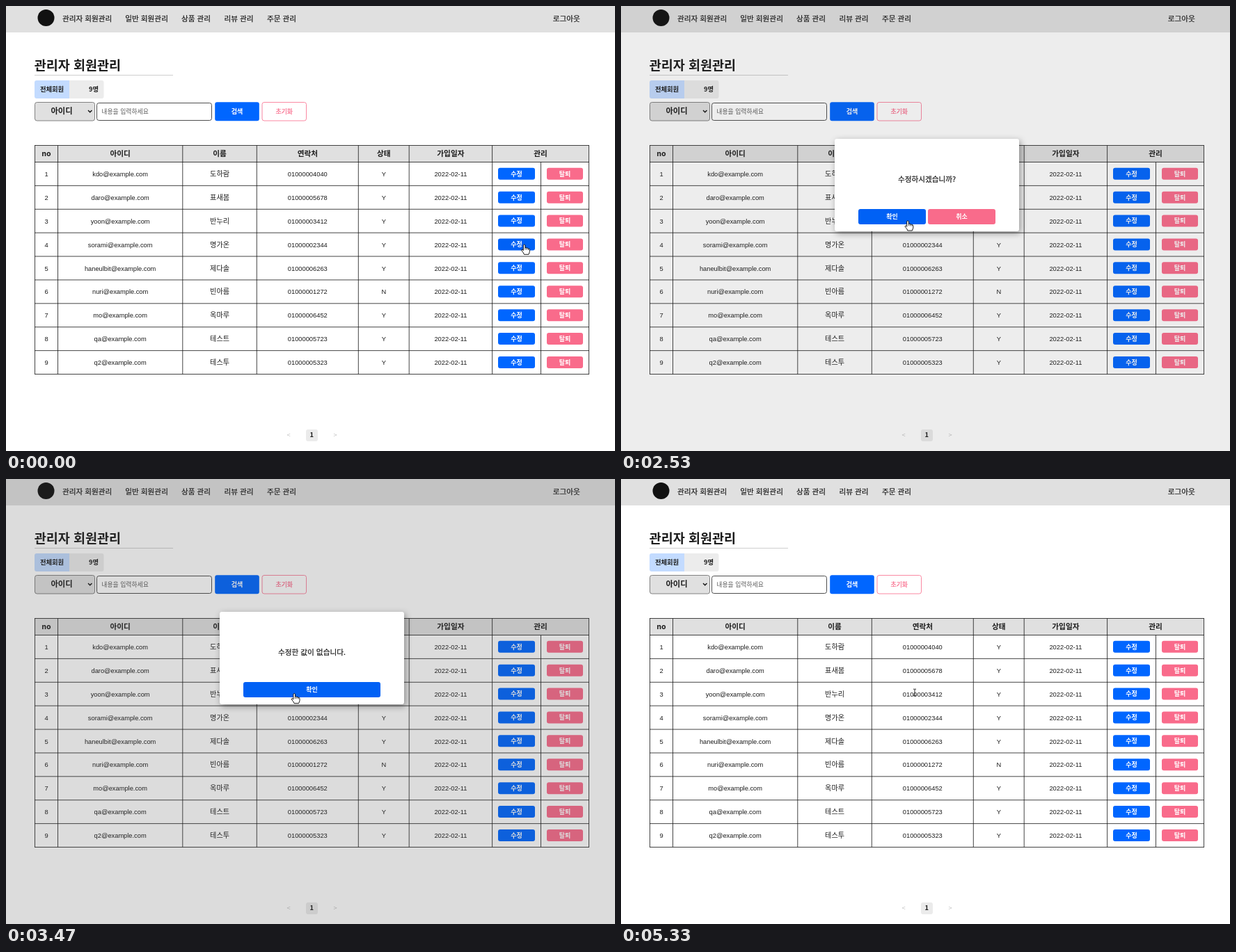
These frames come from a looping animation (875x640 px, 5.39 s). An HTML page:

```html
<!DOCTYPE html>
<html lang="ko">
<head>
<meta charset="utf-8">
<title>관리자 회원관리</title>
<style>
html, body { margin: 0; width: 100%; height: 100%; overflow: hidden; background: #fff; }
svg { display: block; width: 875px; height: 640px; }
text { font-family: "Noto Sans CJK KR", "Noto Sans CJK", "Noto Sans KR", sans-serif; white-space: pre; }
text.latin { font-family: "Liberation Sans", Arial, sans-serif; }
#modal { filter: drop-shadow(2px 3px 5px rgba(0, 0, 0, .38)); }
</style>
</head>
<body>
<svg id="stage" viewBox="0 0 875 640" xmlns="http://www.w3.org/2000/svg">
  <g id="page"></g>
  <rect id="shade" width="875" height="640" fill="#444" opacity="0"/>
  <rect id="modal" x="307" y="191" width="265" height="133" rx="3.3" fill="#fff"/>
  <g id="ask"></g>
  <g id="notice"></g>
  <g id="hand" fill="#fff" stroke="#000" stroke-width=".9" stroke-linejoin="round">
    <path d="M-1.3 .9Q0 -.7 1.3 .9V4.7Q2.6 4 3.6 5.2Q5 4.6 5.9 6Q7.6 5.6 7.8 7.4V10.4L6.4 14.3H-.2L-1.2 12L-3.8 8.7Q-4.1 6.9 -2.4 7.4L-1.3 8.6Z"/>
    <path d="M1.3 4.7V7.6M3.6 5.2V7.8M5.9 6V8" fill="none" stroke-width=".7"/>
  </g>
  <path id="arrow" d="M.4 .6V11.4L2.8 9.1L4.5 12.9L6.1 12.2L4.4 8.5H7.7Z" fill="#fff" stroke="#000" stroke-width=".85"/>
  <path id="beam" d="M-2 -4.8H-.6L0 -4.3L.6 -4.8H2M0 -4.3V4.3M-2 4.8H-.6L0 4.3L.6 4.8H2" fill="none" stroke="#111" stroke-width=".9"/>
</svg>
<script>
const $ = id => document.getElementById(id);
const BLUE = '#0066ff', HOVER = '#0061f5', PINK = '#f96b8b', GREY = '#e0e0e0', INK = '#1c1c1c';
const LOOP = 5390;

function add(parent, tag, attrs, content) {
  const el = document.createElementNS('http://www.w3.org/2000/svg', tag);
  for (const key in attrs) el.setAttribute(key, attrs[key]);
  if (content !== undefined) el.textContent = content;
  parent.appendChild(el);
  return el;
}

const box = (parent, x, y, width, height, fill, more) =>
  add(parent, 'rect', { x, y, width, height, fill, ...more });

// y is the middle of the line of text
function label(parent, content, x, y, size, more) {
  return add(parent, 'text', {
    x, y: y + size * 0.37, 'font-size': size, fill: INK, 'text-anchor': 'middle', ...more
  }, content);
}

const bold = { 'font-weight': 700 };
const left = { 'text-anchor': 'start' };
// a hairline outline gives a weight between regular and bold
const medium = (color = INK) => ({ fill: color, stroke: color, 'stroke-width': .22 });

function button(parent, content, x, y, w, h, fill) {
  const face = box(parent, x, y, w, h, fill, { rx: 3 });
  label(parent, content, x + w / 2, y + h / 2, 9, { ...bold, fill: '#fff' });
  return face;
}

function drawTop(page) {
  box(page, 0, 0, 875, 38, GREY);
  add(page, 'circle', { cx: 57.5, cy: 17, r: 12, fill: '#111' });
  const menu = [['관리자 회원관리', 81], ['일반 회원관리', 171.3], ['상품 관리', 252], ['리뷰 관리', 313.5], ['주문 관리', 375], ['로그아웃', 785.7]];
  for (const [name, x] of menu) label(page, name, x, 17.6, 10.63, { ...left, ...medium() });

  label(page, '관리자 회원관리', 40.7, 85.3, 18.5, { ...left, ...bold });
  box(page, 41, 99, 199, .8, '#c4c4c4');

  add(page, 'path', { d: 'M91 107H44a3 3 0 0 0 -3 3v20a3 3 0 0 0 3 3h47z', fill: '#c3dbff' });
  add(page, 'path', { d: 'M91 107h46.5a3 3 0 0 1 3 3v20a3 3 0 0 1 -3 3H91z', fill: '#ececec' });
  label(page, '전체회원', 66, 119.8, 9.3, bold);
  label(page, '9명', 133, 119.8, 9.3, { ...bold, 'text-anchor': 'end' });
}

function drawSearch(page) {
  const border = { rx: 3, 'stroke-width': .8 };
  box(page, 41.5, 138.5, 86, 26.5, GREY, { ...border, stroke: '#666' });
  label(page, '아이디', 80, 151.2, 11.3, bold);
  add(page, 'path', { d: 'M118 150l2.7 2.8l2.7 -2.8', fill: 'none', stroke: '#111', 'stroke-width': 1.4 });
  box(page, 130.5, 139.5, 165, 25, '#fff', { ...border, stroke: '#222' });
  label(page, '내용을 입력하세요', 137.3, 151.8, 8.86, { ...left, fill: '#5c5c5c' });
  button(page, '검색', 300.2, 138.2, 63.6, 27.1, BLUE);
  box(page, 368, 138.5, 63.5, 26.5, '#fff', { ...border, stroke: PINK });
  label(page, '초기화', 399.8, 151.8, 8.86, medium(PINK));
}

function drawTable(page) {
  const columns = [41.5, 74.5, 253.8, 360.3, 506.3, 579.2, 698.6, 768.5, 837.5];
  const rowY = i => 224.5 + i * 33.89;
  const mid = i => (columns[i] + columns[i + 1]) / 2;
  const members = [
    ['kdo@example.com', '도하람', '4040'],
    ['daro@example.com', '표새봄', '5678'],
    ['yoon@example.com', '반누리', '3412'],
    ['sorami@example.com', '명가온', '2344'],
    ['haneulbit@example.com', '제다솔', '6263'],
    ['nuri@example.com', '빈아름', '1272'],
    ['mo@example.com', '옥마루', '6452'],
    ['qa@example.com', '테스트', '5723'],
    ['q2@example.com', '테스투', '5323']
  ];

  box(page, 41.5, 200.5, 796, 24, GREY);
  ['no', '아이디', '이름', '연락처', '상태', '가입일자'].forEach((name, i) =>
    label(page, name, mid(i), 212.4, 10.63, bold));
  label(page, '관리', 768, 212.4, 10.63, bold);

  members.forEach(([mail, name, digits], i) => {
    const y = rowY(i) + 16.8;
    const cells = [i + 1, mail, name, '0100000' + digits, i === 5 ? 'N' : 'Y', '2022-02-11'];
    cells.forEach((value, c) => c === 2
      ? label(page, value, mid(c), y, 10.1)
      : label(page, value, mid(c), y + .2, 9.3, { class: 'latin' }));
    const edit = button(page, '수정', 707, y - 8.5, 53, 17, BLUE);
    if (i === 3) edit.id = 'edit';
    button(page, '탈퇴', 777, y - 8.5, 52, 17, PINK);
  });

  let d = 'M41 200.5H838';
  for (let i = 0; i < 10; i++) d += `M41 ${rowY(i)}H838`;
  columns.forEach((x, i) => d += `M${x} ${i === 7 ? 224.5 : 200.5}V529.5`);
  add(page, 'path', { d, fill: 'none', stroke: '#151515', 'stroke-width': .8 });
}

function drawPager(page) {
  label(page, '<', 406, 617, 9.3, { fill: '#c4c4c4' });
  box(page, 431, 609, 17, 17, '#ebebeb', { rx: 3 });
  label(page, '1', 439.2, 617, 9.3, bold);
  label(page, '>', 473, 617, 9.3, { fill: '#c4c4c4' });
}

function drawDialogs() {
  label($('ask'), '수정하시겠습니까?', 439.5, 248.8, 10.63, medium());
  button($('ask'), '확인', 341, 292, 97, 22, BLUE).id = 'yes';
  button($('ask'), '취소', 441, 292, 97, 22, PINK);
  label($('notice'), '수정한 값이 없습니다.', 439.5, 248.8, 10.63, medium());
  button($('notice'), '확인', 341, 292, 197, 22, HOVER);
}

// start time, x, y, pointer
const moves = [
  [0, 744.6, 343, 'hand'],
  [1600, 744.5, 342, 'arrow'],
  [1870, 738, 340, 'arrow'],
  [1935, 700, 334, 'arrow'],
  [2000, 632, 324, 'arrow'],
  [2070, 552, 314, 'arrow'],
  [2135, 474, 305, 'hand'],
  [2200, 416, 300, 'hand'],
  [2270, 392, 302, 'hand'],
  [2335, 396, 308, 'hand'],
  [2400, 412, 312.5, 'hand'],
  [2470, 412, 311, 'hand'],
  [2530, 412, 308.7, 'hand'],
  [3470, 414.2, 308.4, 'hand'],
  [3535, 417.5, 307.8, 'hand'],
  [3600, 420.2, 307.2, 'hand'],
  [5330, 422, 307, 'beam']
];

const show = (id, on) => $(id).setAttribute('visibility', on ? 'visible' : 'hidden');

function render(t) {
  const asking = t >= 1600 && t < 3070;
  const noticing = t >= 3070 && t < 5270;
  $('shade').setAttribute('opacity', asking ? .096 : noticing ? .187 : 0);
  show('modal', asking || noticing);
  show('ask', asking);
  show('notice', noticing);

  const [, x, y, kind] = moves.findLast(m => m[0] <= t);
  for (const id of ['hand', 'arrow', 'beam']) show(id, id === kind);
  $(kind).setAttribute('transform', `translate(${x} ${y})`);
  $('edit').setAttribute('fill', t < 1600 ? HOVER : BLUE);
  $('yes').setAttribute('fill', kind === 'hand' && x < 438 ? HOVER : BLUE);
}

for (const draw of [drawTop, drawSearch, drawTable, drawPager]) draw($('page'));
drawDialogs();

const start = performance.now();
function tick() {
  render((performance.now() - start) % LOOP);
  requestAnimationFrame(tick);
}
tick();
</script>
</body>
</html>
```
